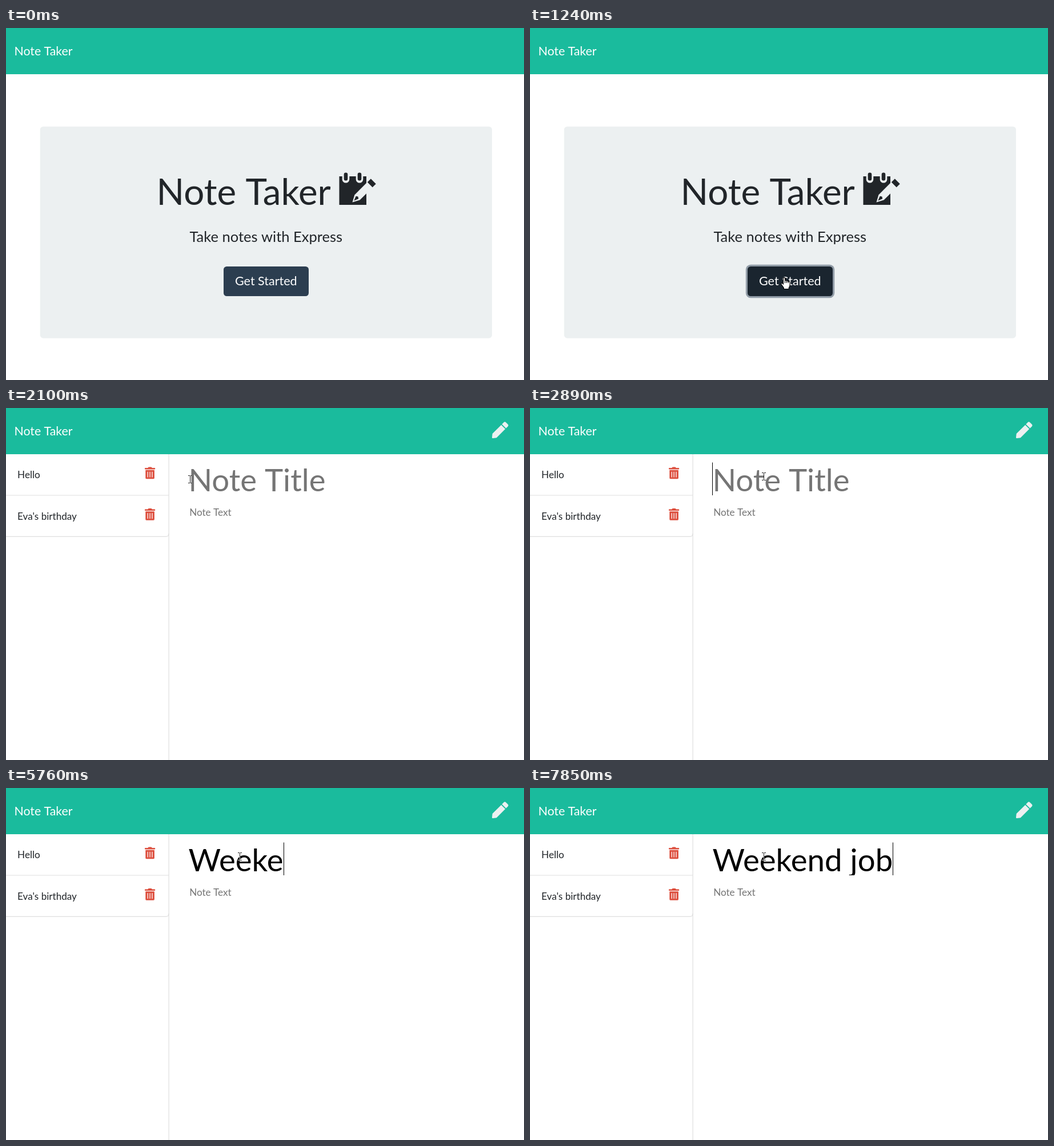
These frames come from a looping animation (907 by 617 pixels, 8000 ms). An HTML page with a canvas:

```html
<!DOCTYPE html>
<html lang="en">
<head>
<meta charset="utf-8">
<title>Note Taker</title>
<style>
  html, body { margin: 0; width: 100%; height: 100%; overflow: hidden; background: #fff; }
  canvas { display: block; width: 907px; height: 617px; }
</style>
</head>
<body>
<canvas id="stage"></canvas>
<script>
const W = 907, H = 617, LOOP = 8000;
const canvas = document.getElementById('stage');
const ctx = canvas.getContext('2d');
const dpr = window.devicePixelRatio || 1;
canvas.width = W * dpr;
canvas.height = H * dpr;

const INK = '#212529', PANEL = '#ecf0f1', LINE = '#dfdfdf', HINT = '#757575';

const TRASH = new Path2D('M32 464a48 48 0 0 0 48 48h288a48 48 0 0 0 48-48V128H32z' +
  'm272-256a16 16 0 0 1 32 0v224a16 16 0 0 1-32 0zm-96 0a16 16 0 0 1 32 0v224a16 16 0 0 1-32 0z' +
  'm-96 0a16 16 0 0 1 32 0v224a16 16 0 0 1-32 0zM432 32H312l-10-19A24 24 0 0 0 281 0H167' +
  'a24 24 0 0 0-21 13L136 32H16A16 16 0 0 0 0 48v32a16 16 0 0 0 16 16h416a16 16 0 0 0 16-16V48a16 16 0 0 0-16-16z');
const PEN = new Path2D('M291 93L419 221 141 499 27 512Q-2 513 0 485L13 371z' +
  'M498 74L438 14a48 48 0 0 0-68 0L313 71 441 199l57-57a48 48 0 0 0 0-68z');
const ARROW = new Path2D('M.5.5v16l3.7-3.5 2.5 5.6 2.4-1-2.5-5.6h5z');
const HAND = new Path2D('M-1.5 1.2Q0-.4 1.5 1.2V6Q3.2 4.8 4.4 6.6 6.2 5.6 7.2 7.4' +
  'Q9.6 6.6 10 9v5Q9.6 17 8.2 18.2V20.5H-.6V18.4L-5 12.4Q-5.6 9.4-3 10.6L-1.5 12z');

// Pointer steps: [time, shape, x, y]
const MOVES = [
  [300, 'arrow', 752, 598], [380, 'arrow', 540, 500], [460, 'arrow', 374, 419],
  [690, 'hand', 392, 427], [770, 'hand', 416, 433], [850, 'hand', 435, 436], [930, 'hand', 445, 437],
  [1470, 'beam', 425, 385], [1550, 'beam', 371, 245], [1630, 'arrow', 318, 112], [1700, 'arrow', 296, 62],
  [1870, 'arrow', 298, 68], [1950, 'arrow', 303, 84], [2030, 'beam', 322, 125], [2110, 'beam', 340, 152],
  [2190, 'beam', 358, 170], [2270, 'beam', 378, 165], [2350, 'beam', 396, 143], [2420, 'beam', 405, 126],
  [2500, 'beam', 408, 119.5], [2730, 'beam', 415, 120], [2810, 'beam', 411, 120], [2890, 'beam', 409, 119.5]
];
const TITLE = 'Weekend job';
const KEYS = [4980, 5140, 5370, 5530, 5760, 5990, 6070, 6530, 7150, 7300, 7850];
const BLINKS = [2730, 3280, 3740, 4280, 4830];

const passed = (times, t) => times.filter(k => k <= t).length;

function text(str, x, y, size, color, align = 'left') {
  ctx.font = size + 'px Lato, sans-serif';
  ctx.textAlign = align;
  ctx.fillStyle = color;
  ctx.fillText(str, x, y);
}

function box(x, y, w, h, r, color) {
  ctx.fillStyle = color;
  ctx.beginPath();
  ctx.roundRect(x, y, w, h, r);
  ctx.fill();
}

function icon(path, x, y, scale, color) {
  ctx.save();
  ctx.translate(x, y);
  ctx.scale(scale, scale);
  ctx.fillStyle = color;
  ctx.fill(path);
  ctx.restore();
}

function notepad() {
  box(583.5, 260, 47.5, 50, 0, INK);
  for (const x of [595, 619]) {
    box(x - 6.3, 252, 12.6, 19.5, 6.3, PANEL);
    box(x - 3.3, 253.5, 6.6, 14, 3.3, INK);
  }
  ctx.save();
  ctx.translate(606.5, 305.5);
  ctx.rotate(-Math.PI / 4);
  ctx.fillStyle = PANEL;
  ctx.beginPath();
  ctx.moveTo(0, 0);
  ctx.lineTo(12, -6.5);
  ctx.lineTo(44, -6.5);
  ctx.lineTo(44, 6.5);
  ctx.lineTo(12, 6.5);
  ctx.fill();
  ctx.fillStyle = INK;
  ctx.beginPath();
  ctx.moveTo(4, 0);
  ctx.lineTo(12, -3.2);
  ctx.lineTo(14, 0);
  ctx.lineTo(12, 3.2);
  ctx.fill();
  ctx.fillRect(43.5, -6.3, 8.5, 12.6);
  ctx.restore();
}

function header() {
  box(0, 0, W, 81, 0, '#1abb9d');
  text('Note Taker', 14.5, 47.6, 21.3, '#fff');
}

function button(t) {
  const ring = t < 1080 ? 0 : t < 1160 ? 0.55 : 1;
  if (ring) {
    const g = 3.2 * ring;
    box(381 - g, 418 - g, 149 + 2 * g, 52 + 2 * g, 5.5 + g, '#919ca7');
  }
  const fill = t < 690 ? '#2c3e50' : t < 770 ? '#263646' : t < 1080 ? '#1e2b37' : '#1a252f';
  box(381, 418, 149, 52, 5.5, fill);
  text('Get Started', 455.3, 451.3, 21.5, '#fff', 'center');
}

function welcome(t) {
  box(59.7, 172.7, 791.3, 371, 5.5, PANEL);
  text('Note Taker', 263.6, 310, 63.7, INK);
  notepad();
  text('Take notes with Express', 455.3, 375, 25.5, INK, 'center');
  button(t);
}

function listItem(label, y) {
  text(label, 20.1, y + 42.3, 17.1, INK);
  icon(TRASH, 243, y + 22.6, 0.0405, '#dd4f3e');
}

function editor(t) {
  icon(PEN, 851, 24.5, 0.0555, PANEL);
  listItem('Hello', 81);
  listItem("Eva's birthday", 153.5);

  box(284.5, 81, 1.2, H - 81, 0, LINE);
  box(0, 152.5, 285, 1.1, 0, LINE);
  ctx.strokeStyle = LINE;
  ctx.lineWidth = 1.1;
  ctx.beginPath();
  ctx.moveTo(0, 225.4);
  ctx.lineTo(280, 225.4);
  ctx.quadraticCurveTo(285, 225.4, 285, 220);
  ctx.stroke();

  const typed = TITLE.slice(0, passed(KEYS, t));
  ctx.save();
  ctx.beginPath();
  ctx.rect(319, 95, 560, 58);
  ctx.clip();
  text(typed || 'Note Title', 319.5, 146, 54.6, typed ? '#000' : HINT);
  const width = typed ? ctx.measureText(typed).width : 0;
  const caret = typed ? !(t >= 7070 && t < 7150) : passed(BLINKS, t) % 2 === 1;
  if (caret) box(Math.round(319.4 + width), 95.5, 1, 57.5, 0, '#000');
  ctx.restore();

  text('Note Text', 321.2, 189, 17.1, HINT);
}

function beam(x, y) {
  ctx.save();
  ctx.globalCompositeOperation = 'difference';
  ctx.fillStyle = '#ddd';
  x = Math.round(x);
  y = Math.round(y);
  ctx.fillRect(x - 3, y - 7, 3, 1);
  ctx.fillRect(x + 1, y - 7, 3, 1);
  ctx.fillRect(x, y - 6, 1, 12);
  ctx.fillRect(x - 3, y + 6, 3, 1);
  ctx.fillRect(x + 1, y + 6, 3, 1);
  ctx.restore();
}

function pointer(t) {
  const n = passed(MOVES.map(m => m[0]), t);
  if (!n) return;
  const [, shape, x, y] = MOVES[n - 1];
  if (shape === 'beam') return beam(x, y);
  const path = shape === 'hand' ? HAND : ARROW;
  ctx.save();
  ctx.translate(x, y);
  ctx.fillStyle = '#fff';
  ctx.strokeStyle = '#000';
  ctx.lineWidth = 1.1;
  ctx.fill(path);
  ctx.stroke(path);
  if (shape === 'hand') {
    ctx.beginPath();
    for (const k of [1.5, 4.4, 7.2]) {
      ctx.moveTo(k, 6.5);
      ctx.lineTo(k, 10);
    }
    ctx.stroke();
  }
  ctx.restore();
}

function draw(t) {
  ctx.setTransform(dpr, 0, 0, dpr, 0, 0);
  box(0, 0, W, H, 0, '#fff');
  header();
  if (t < 1320) welcome(t);
  else editor(t);
  pointer(t);
}

const start = performance.now();
function tick() {
  draw((performance.now() - start) % LOOP);
  requestAnimationFrame(tick);
}
tick();
</script>
</body>
</html>
```
